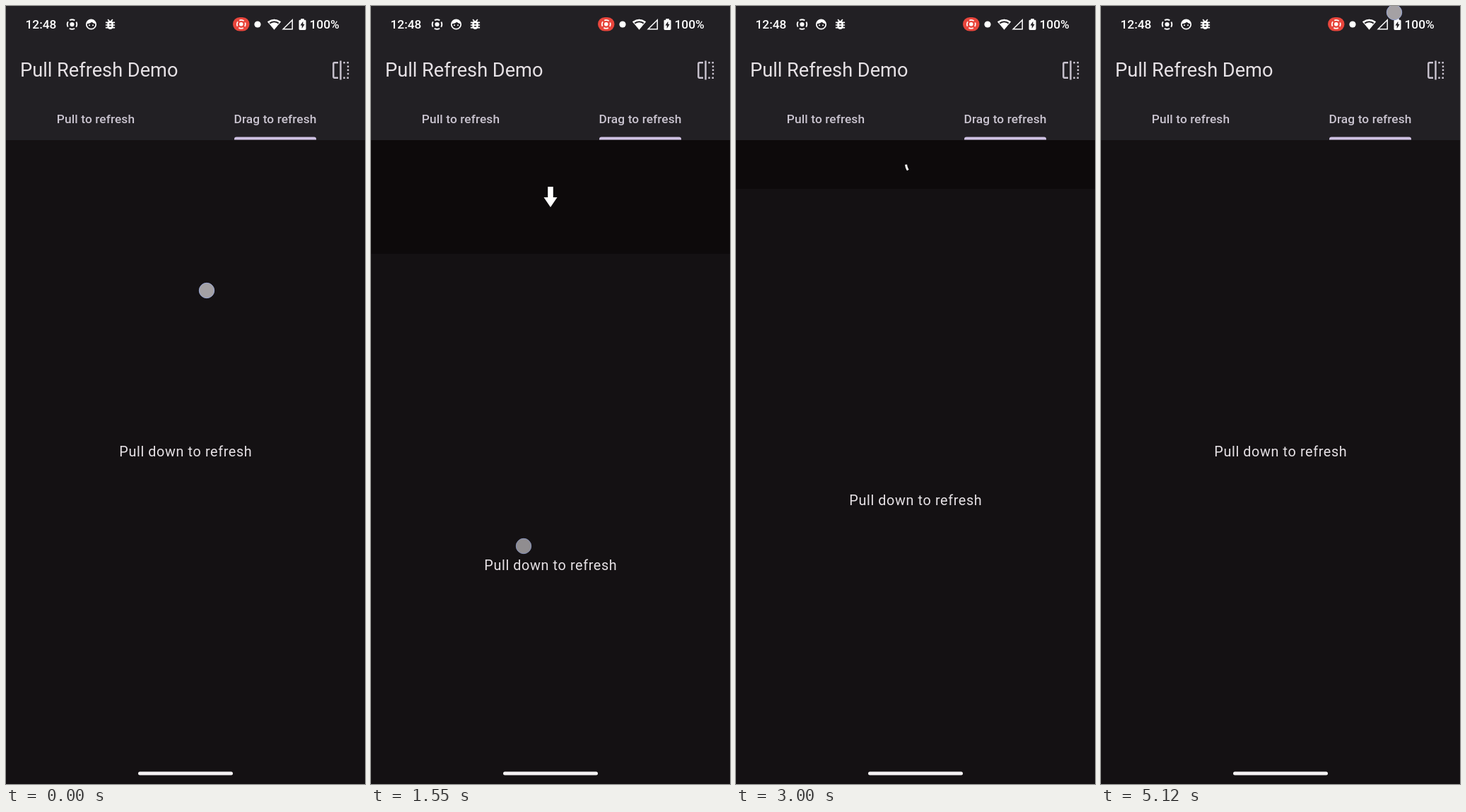
An HTML page that plays this animation: 508x1102 px, repeating every 5.36 s.

```html
<!DOCTYPE html>
<html lang="en">
<head>
<meta charset="utf-8">
<title>Pull Refresh Demo</title>
<style>
  html, body { margin: 0; width: 100%; height: 100%; overflow: hidden; background: #141113; }
  svg { display: block; width: 508px; height: 1102px; font-family: Roboto, "Noto Sans", sans-serif; }
  .status { font-size: 17.3px; font-weight: 500; fill: #fff; }
  .title { font-size: 27.2px; fill: #e6e1e5; }
  .tab { font-size: 17.3px; font-weight: 500; letter-spacing: .12px; fill: #cac4d0; text-anchor: middle; }
  .body { font-size: 19.8px; letter-spacing: .62px; fill: #e6e1e5; text-anchor: middle; }
</style>
</head>
<body>
<svg viewBox="0 0 508 1102">
  <defs>
    <g id="record">
      <circle r="3.1" fill="#fff"/>
      <circle r="6.8" fill="none" stroke="#fff" stroke-width="1.9" stroke-dasharray="7.68 3" stroke-dashoffset="3.84"/>
    </g>
  </defs>

  <rect width="508" height="1102" fill="#141113"/>
  <rect id="panel" y="190" width="508" height="0" fill="#0d0a0b"/>
  <g id="indicator">
    <path id="arrow" fill="#fff" d="M-3.8-14.5h7.6V.5h5.7L0 14.5-9.5.5h5.7z"/>
    <path id="spinner" fill="none" stroke="#fff" stroke-width="3" stroke-linecap="square"/>
  </g>
  <text id="message" class="body" x="254.3" y="638">Pull down to refresh</text>

  <!-- app bar and tabs -->
  <rect width="508" height="190" fill="#222024"/>
  <text class="title" x="20" y="100">Pull Refresh Demo</text>
  <text class="tab" x="127" y="166">Pull to refresh</text>
  <text class="tab" x="381" y="166">Drag to refresh</text>
  <path d="M323 189.5v-1a3 3 0 0 1 3-3h110a3 3 0 0 1 3 3v1z" fill="#cfc1e3"/>
  <g fill="none" stroke="#cac4d0" stroke-width="2.4">
    <path d="M470 80.2h-5.2a1.5 1.5 0 0 0-1.5 1.5v18.6a1.5 1.5 0 0 0 1.5 1.5h5.2M473.5 77.5v27"/>
    <path d="M477.3 80.2h8M477.3 101.8h8M484 84.5v15" stroke-dasharray="2.5 2.6"/>
  </g>

  <!-- status bar -->
  <text class="status" x="27.5" y="31.8">12:48</text>
  <use href="#record" x="93.5" y="26"/>
  <g transform="translate(120.5 26)">
    <circle r="6.7" fill="none" stroke="#fff" stroke-width="1.7"/>
    <path d="M-6.7-.8A6.8 6.8 0 0 1 6.7-.8Q3-1 1-3.2-2-.6-6.7-.8z" fill="#fff"/>
    <circle cx="-2.5" cy="1.2" r="1" fill="#fff"/>
    <circle cx="2.5" cy="1.2" r="1" fill="#fff"/>
  </g>
  <g transform="translate(147.5 26)">
    <rect x="-4.2" y="-5" width="8.4" height="12" rx="4.2" fill="#fff"/>
    <path d="M-6.6-2.6H6.6M-6.6 1H6.6M-6.6 4.6H6.6M-3.4-6.8-1-4.2M3.4-6.8 1-4.2" stroke="#fff" stroke-width="1.7"/>
    <path d="M-1.6-.8h3.2M-1.6 2.8h3.2" stroke="#222024" stroke-width="1.5"/>
  </g>
  <rect x="321" y="16" width="23.5" height="19.5" rx="9.7" fill="#e8453c"/>
  <use href="#record" transform="translate(332.8 25.8) scale(.88)"/>
  <circle cx="356" cy="26" r="4.6" fill="#fff"/>
  <path d="M379.5 33.7 370 22.3Q379.5 15.2 389 22.3z" fill="#fff"/>
  <path d="M371.8 22.8Q379.5 17.5 387.2 22.8L385.2 25.2Q379.5 21.3 373.8 25.2z" fill="#222024"/>
  <path d="M370 22.3Q379.5 15.2 389 22.3L387.4 24.2Q379.5 18.4 371.6 24.2z" fill="#fff"/>
  <path d="M405.2 19.8v13h-13z" fill="none" stroke="#fff" stroke-width="1.5"/>
  <path d="M417.3 18h4.4v1.7h1.4a1.4 1.4 0 0 1 1.4 1.4v11.5a1.4 1.4 0 0 1-1.4 1.4h-7.2a1.4 1.4 0 0 1-1.4-1.4V21.1a1.4 1.4 0 0 1 1.4-1.4h1.4z" fill="#fff"/>
  <path d="M420.3 21.8v4h2.3l-3.9 6.2v-4.4h-2.3z" fill="#222024"/>
  <text class="status" x="429.5" y="31.8">100%</text>

  <rect x="187" y="1084.5" width="134" height="5" rx="2.5" fill="#f4f2f3"/>
  <circle id="touch" r="10.7" fill="#a4a1a4" stroke="#9ba8d6" stroke-width="1"/>
</svg>

<script>
const LOOP = 5360, RELEASE = 1560, DONE = 4580, TAP = 5120;
const REST = 69, TOP = 190;
const $ = id => document.getElementById(id);
const [panel, indicator, arrow, spinner, message, touch] =
  ["panel", "indicator", "arrow", "spinner", "message", "touch"].map($);

// [ms, x, y] of the finger
const finger = [
  [0, 284, 403], [90, 284, 405], [250, 283, 443], [450, 281, 516], [660, 263, 606],
  [880, 237, 688], [1100, 222, 741], [1320, 216.5, 763], [1550, 216, 765]
];
// finger height -> pull distance
const pull = [[403, 0], [413, 0], [516, 46.5], [688, 127.5], [765, 161]];

const clamp = (v, lo = 0, hi = 1) => Math.min(hi, Math.max(lo, v));

function slope(pts, i, c) {
  const a = pts[i - 1], b = pts[i + 1];
  return a && b ? (b[c] - a[c]) / (b[0] - a[0]) : 0;
}

function segment(pts, v) {
  let i = 0;
  while (i < pts.length - 2 && v > pts[i + 1][0]) i++;
  const span = pts[i + 1][0] - pts[i][0];
  return { i, span, u: clamp((v - pts[i][0]) / span) };
}

function linear(pts, v) {
  const { i, u } = segment(pts, v);
  return pts[i][1] + (pts[i + 1][1] - pts[i][1]) * u;
}

function smooth(pts, v, c) {
  const { i, span, u } = segment(pts, v);
  const h = u * u * (3 - 2 * u);
  return pts[i][c] * (1 - h) + pts[i + 1][c] * h
    + span * (slope(pts, i, c) * u * (1 - u) ** 2 - slope(pts, i + 1, c) * u * u * (1 - u));
}

// cubic-bezier(.4, 0, .2, 1)
function ease(x) {
  let lo = 0, hi = 1;
  for (let k = 0; k < 24; k++) {
    const s = (lo + hi) / 2, r = 1 - s;
    if (1.2 * s * r * r + .6 * s * s * r + s ** 3 < x) lo = s; else hi = s;
  }
  return lo * lo * (3 - 2 * lo);
}

const spring = ms => (1 + ms * .028) * Math.exp(-ms * .028);

function distance(t) {
  if (t < RELEASE) return linear(pull, smooth(finger, t, 2));
  if (t < DONE) return REST + (161 - REST) * spring(t - RELEASE);
  const d = REST * spring(t - DONE);
  return d < .3 ? 0 : d;
}

function arc(ms) {
  const turn = Math.floor(ms / 1332), phase = ms % 1332;
  const base = -90 + turn * 216 + phase / 1332 * 286;
  const from = base + 290 * ease(clamp((phase - 666) / 666));
  const to = Math.max(from + .5, base + 290 * ease(clamp(phase / 666)));
  const point = a => [Math.cos(a * Math.PI / 180), Math.sin(a * Math.PI / 180)]
    .map(n => (n * 13.3).toFixed(2)).join(" ");
  return `M${point(from)}A13.3 13.3 0 ${to - from > 180 ? 1 : 0} 1 ${point(to)}`;
}

function draw(t) {
  const d = distance(t), busy = t >= RELEASE && t < DONE;
  panel.setAttribute("height", d);
  message.setAttribute("transform", `translate(0 ${d})`);
  indicator.setAttribute("transform", `translate(254 ${TOP + d / 2})`);
  arrow.setAttribute("transform", `scale(${clamp(d / 59)})`);
  arrow.setAttribute("visibility", busy ? "hidden" : "visible");
  spinner.setAttribute("visibility", busy ? "visible" : "hidden");
  if (busy) spinner.setAttribute("d", arc(t - RELEASE));

  const tap = t >= TAP;
  touch.setAttribute("cx", tap ? 415 : smooth(finger, t, 1));
  touch.setAttribute("cy", tap ? 9 : smooth(finger, t, 2));
  touch.setAttribute("opacity", tap ? 1 : clamp(1 - (t - 1540) / 80));
}

const start = performance.now();
function tick() {
  draw((performance.now() - start) % LOOP);
  requestAnimationFrame(tick);
}
tick();
</script>
</body>
</html>
```
